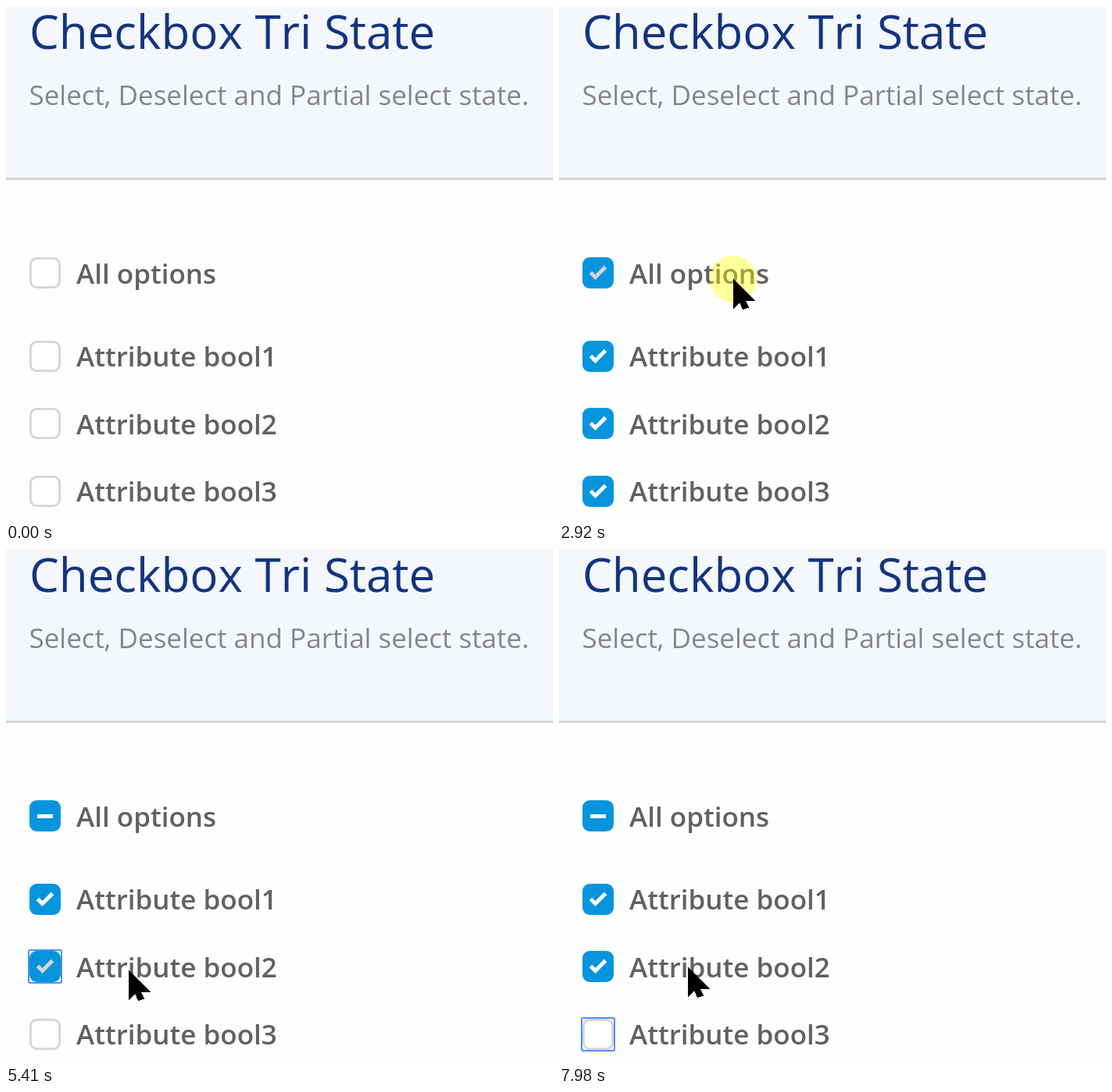
An HTML page for the animation above (8000 ms loop, 700x660 px).

```html
<!DOCTYPE html>
<html lang="en">
<head>
<meta charset="utf-8">
<title>Checkbox Tri State</title>
<style>
  html, body { margin: 0; width: 100%; height: 100%; overflow: hidden; background: #fefefe; }
  svg { display: block; width: 700px; height: 660px; }
  text { font-family: "Open Sans", sans-serif; font-size: 35px; font-kerning: none; }
  .title { font-size: 60px; fill: #14347f; }
  .sub { fill: #868686; }
  .label { font-weight: 600; fill: #616161; }
  .box {
    stroke-width: 2.8;
    fill: color-mix(in srgb, #0695dd var(--on), #fff);
    stroke: color-mix(in srgb, #0695dd var(--on), #d5d5d5);
  }
  .tick, .dash { fill: none; stroke-width: 5; }
  .focus { fill: none; stroke: #4d90f5; stroke-width: 2; }
</style>
</head>
<body>
<svg viewBox="0 0 700 660">
  <rect width="700" height="660" fill="#fefefe"/>
  <rect width="700" height="220" fill="#f4f8fd"/>
  <rect y="220" width="700" height="3" fill="#d5d5d5"/>
  <text class="title" x="30" y="55">Checkbox Tri State</text>
  <text class="sub" x="29.5" y="127">Select, Deselect and Partial select state.</text>
  <g id="rows"></g>
  <circle id="press" r="30" fill="#ff0" fill-opacity=".4"/>
  <path id="cursor" d="M0 0L28 27V28H16L20 36.5L12 39L8 30L0 38Z" shape-rendering="crispEdges"/>
</svg>
<script>
  const LOOP = 8000, STEP = 77, PRESS = 160;
  const LABELS = ['All options', 'Attribute bool1', 'Attribute bool2', 'Attribute bool3'];
  const rowY = n => n ? 342.5 + 86.5 * n : 322.5;

  // release time and row
  const CLICKS = [[1610, 0], [3070, 0], [4170, 1], [5030, 2], [6190, 0], [7750, 3]];

  // start, number of steps, tip position reached
  const MOVES = [
    [280, 1, 536, 562], [360, 6, 241, 360], [970, 3, 223, 350],
    [3480, 4, 163, 455], [4390, 4, 157, 537],
    [5410, 1, 157, 540], [5490, 6, 189, 342],
    [6800, 4, 178, 592], [7280, 3, 172, 613], [7820, 3, 165, 536]
  ];

  const $ = id => document.getElementById(id);
  const show = (el, on) => el.setAttribute('visibility', on ? 'visible' : 'hidden');
  const steps = (t, start, n) => Math.min(1, (Math.floor((t - start) / STEP) + 1) / n);
  const smooth = k => k * k * (3 - 2 * k);

  $('rows').innerHTML = LABELS.map((label, n) => `
    <g transform="translate(30 ${Math.floor(rowY(n))})">
      <rect class="box" x="1.4" y="1.4" width="37.2" height="37.2" rx="8"/>
      <path class="tick" d="M10.5 19.5L16.5 25.5L29.5 12.5"/>
      <path class="dash" d="M10 20.5H30"/>
      <rect class="focus" x="-1" y="-1" width="42" height="42" rx="2"/>
    </g>
    <text class="label" x="90" y="${Math.round(rowY(n) + 33)}">${label}</text>`).join('');

  const boxes = [...$('rows').querySelectorAll('g')].map(g =>
    Object.fromEntries(['box', 'tick', 'dash', 'focus'].map(c => [c, g.querySelector('.' + c)])));

  // 0 empty, 1 checked, 2 partial; the first row sums up the others
  function toggle([all, ...items], row) {
    items = items.map((v, n) => row === 0 ? Number(all !== 1) : n === row - 1 ? 1 - v : v);
    const count = items.reduce((a, b) => a + b);
    return [count === items.length ? 1 : count ? 2 : 0, ...items];
  }

  function pointerAt(t) {
    const i = MOVES.findLastIndex(m => m[0] <= t);
    if (i < 0) return null;
    const [start, n, x, y] = MOVES[i];
    const [, , x0, y0] = MOVES[Math.max(0, i - 1)];
    const k = smooth(steps(t, start, n));
    return [Math.round(x0 + (x - x0) * k), Math.round(y0 + (y - y0) * k)];
  }

  function rowAt(t) {
    const p = pointerAt(t);
    return p && p[0] < 350 ? LABELS.findIndex((_, n) => Math.abs(p[1] - rowY(n) - 20) < 20) : -1;
  }

  function render(t) {
    let before = [0, 0, 0, 0], now = before, released = 0, focus = -1;
    for (const [time, row] of CLICKS.filter(c => c[0] <= t)) {
      before = now;
      now = toggle(now, row);
      released = time;
      focus = row;
    }
    const pressed = CLICKS.some(([time]) => t < time && t >= time - PRESS);
    const blend = steps(t, released, 4);
    const over = rowAt(t);
    const hover = over === rowAt(t - STEP) ? over : -1;

    boxes.forEach((el, n) => {
      const from = Math.min(1, before[n]), to = Math.min(1, now[n]);
      const mark = n === hover ? '#d5d5d5' : '#fff';
      el.box.style.setProperty('--on', 100 * (from + (to - from) * blend) + '%');
      el.tick.setAttribute('stroke', mark);
      el.dash.setAttribute('stroke', mark);
      show(el.tick, now[n] !== 2);
      show(el.dash, now[n] === 2);
      show(el.focus, n === focus && !pressed);
    });

    const p = pointerAt(t);
    show($('cursor'), p);
    show($('press'), pressed);
    if (p) {
      for (const id of ['cursor', 'press']) $(id).setAttribute('transform', `translate(${p})`);
    }
  }

  const start = performance.now();
  function frame() {
    render((performance.now() - start) % LOOP);
    requestAnimationFrame(frame);
  }
  frame();
</script>
</body>
</html>
```
